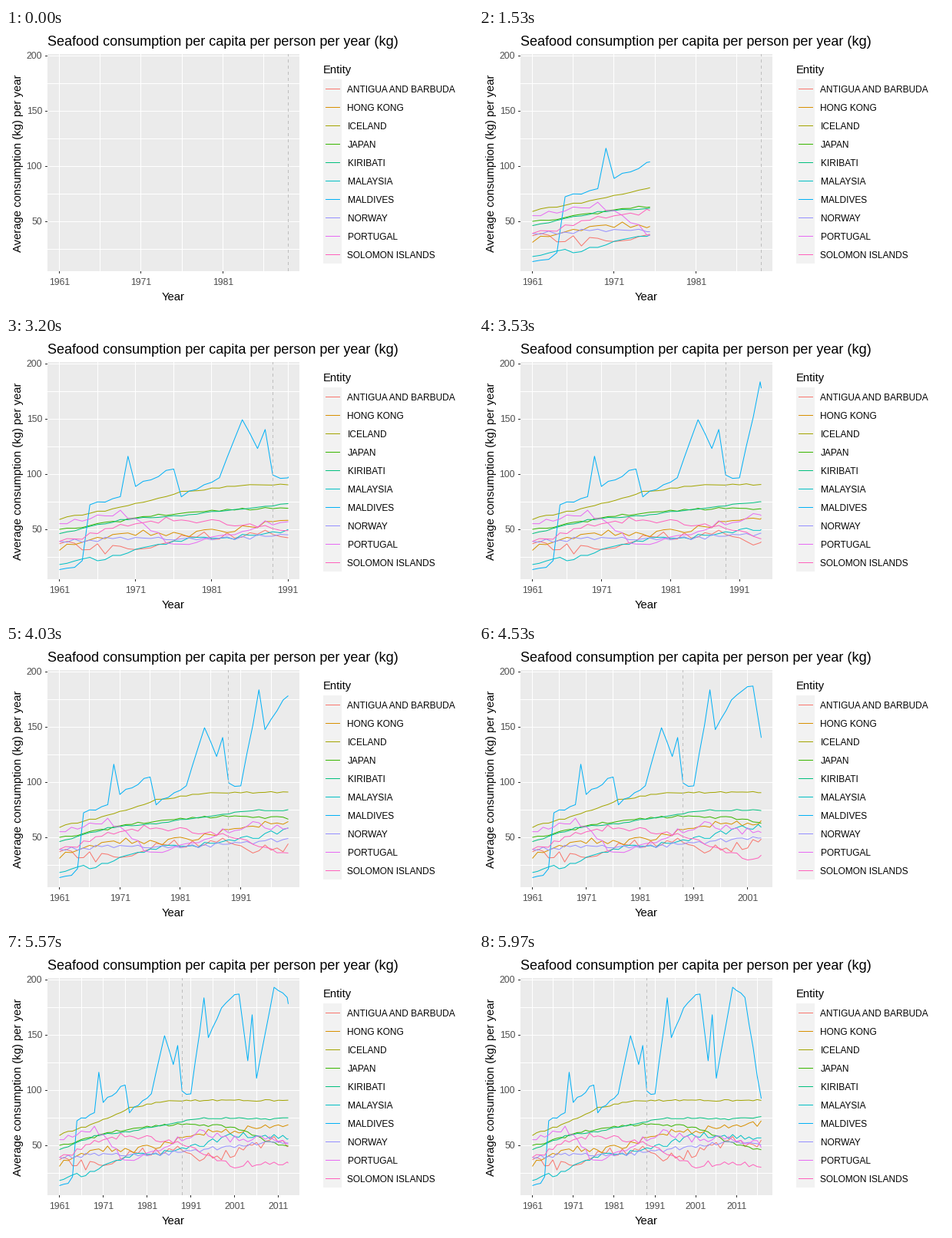
These frames come from a looping animation (608 px wide and 365 px high, 10 s). A matplotlib script:

```python
import matplotlib.pyplot as plt
import numpy as np
from matplotlib.animation import FuncAnimation
from matplotlib.patches import Rectangle

WIDTH, HEIGHT, DPI = 608, 365, 100
PX = 72 / DPI  # points per pixel
LEFT, RIGHT, TOP, BOTTOM = 54, 382, 34, 317
X_FIRST, X_SPAN = 69.5, 298
START, END, MARK = 1961, 2017, 1989
REVEAL_STEPS, STEPS_PER_MS = 180, 0.03
FRAMES, INTERVAL = 500, 20
YEARS = np.arange(START, END + 1)

plt.rcParams["font.family"] = "Liberation Sans"

# name: (colour, yearly wobble, trend at even spacing over the whole span)
TRENDS = {
    "ANTIGUA AND BARBUDA": ("#F8766D", 5, [36, 32, 40, 48, 41, 43, 55, 52]),
    "HONG KONG": ("#D89000", 3, [32, 48, 45, 51, 62, 64, 67, 70]),
    "ICELAND": ("#A3A500", 0.8, [60, 70, 84, 90, 91, 91, 91, 91]),
    "JAPAN": ("#39B600", 1.2, [50, 58, 66, 69, 69, 67, 53, 46]),
    "KIRIBATI": ("#00BF7D", 0.7, [46, 59, 63, 69, 75, 75, 74, 76]),
    "MALAYSIA": ("#00BFC4", 2.5, [20, 26, 41, 44, 50, 60, 58, 58]),
    "MALDIVES": ("#00B0F6", 2, None),
    "NORWAY": ("#9590FF", 2, [39, 42, 41, 43, 46, 50, 53, 51]),
    "PORTUGAL": ("#E76BF3", 4, [55, 65, 34, 50, 61, 56, 56, 52]),
    "SOLOMON ISLANDS": ("#FF62BC", 3, [38, 54, 60, 55, 45, 32, 36, 31]),
}
# The one volatile country follows its turning points instead.
PEAKS = {1961: 13, 1964: 20, 1965: 71, 1969: 81, 1970: 118, 1971: 91,
         1976: 105, 1977: 81, 1982: 97, 1985: 150, 1987: 122, 1988: 142,
         1989: 101, 1991: 95, 1994: 182, 1995: 149, 1999: 181, 2002: 189,
         2004: 127, 2005: 167, 2006: 110, 2010: 192, 2013: 185, 2017: 91}

rng = np.random.default_rng(7)


def yearly_values(wobble, trend):
    if trend:
        known = np.linspace(START, END, len(trend))
    else:
        known, trend = list(PEAKS), list(PEAKS.values())
    return np.interp(YEARS, known, trend) + rng.uniform(-wobble, wobble, YEARS.size)


def y_pos(value):
    return 324.5 - 1.44 * value


def pixel_center(x):
    return np.floor(x) + 0.5


fig = plt.figure(figsize=(WIDTH / 100, HEIGHT / 100), dpi=DPI, facecolor="white")
ax = fig.add_axes([0, 0, 1, 1])
ax.set(xlim=(0, WIDTH), ylim=(HEIGHT, 0))
ax.axis("off")


def line(color, z, xs=(), ys=(), **style):
    return ax.plot(xs, ys, color=color, lw=PX, zorder=z, snap=False,
                   solid_capstyle="butt", **style)[0]


def label(x, y, text, size, color="black", **style):
    return ax.text(x, y, text, fontsize=size * PX, color=color,
                   va="baseline", **style)


def block(x, y, w, h, color):
    ax.add_patch(Rectangle((x, y), w, h, fc=color, lw=0, antialiased=False))


# Panel and vertical axis
block(LEFT, TOP, RIGHT - LEFT, BOTTOM - TOP, "#EBEBEB")
for value in range(25, 201, 25):
    y = y_pos(value)
    line("white", 2, [LEFT, RIGHT], [y, y])
    if value % 50 == 0:
        line("#333333", 2, [LEFT - 3, LEFT], [y, y])
        label(47, y + 3.5, str(value), 12.2, "#4D4D4D", ha="right")

label(54, 23, "Seafood consumption per capita per person per year (kg)", 17.95)
label(218, 355, "Year", 14.8, ha="center")
label(20, 292.5, "Average consumption (kg) per year", 14.8, rotation=90,
      rotation_mode="anchor")

# Legend
label(413, 59, "Entity", 14.8)
block(413, 67, 24, 240, "#F2F2F2")
for row, (name, (color, _, _)) in enumerate(TRENDS.items()):
    y = 79.5 + 24 * row
    line(color, 2, [416, 435], [y, y])
    label(444.5, y + 4.5, name, 11.9)

# Moving parts
grid = {year: line("white", 2) for year in range(START, END + 1, 5)}
ticks = {year: (line("#333333", 2),
                label(0, 335, str(year), 12.3, "#4D4D4D", ha="center"))
         for year in range(START, END + 1, 10)}
curves = [(line(color, 3), yearly_values(wobble, trend))
          for color, wobble, trend in TRENDS.values()]
marker = line("#BEBEBE", 4, linestyle=(0, (4, 4)), dash_capstyle="butt")


def update(frame):
    step = round(frame * INTERVAL * STEPS_PER_MS)
    now = START + (END - START) * min(step / (REVEAL_STEPS - 1), 1)
    scale = X_SPAN / (max(now, MARK) - START)

    def x_pos(year):
        return X_FIRST + (year - START) * scale

    def place(rule, year, y0, y1):
        x = pixel_center(x_pos(year))
        rule.set_data([x, x], [y0, y1])
        rule.set_visible(x < RIGHT)

    for year, rule in grid.items():
        place(rule, year, BOTTOM, TOP)
    for year, (tick, text) in ticks.items():
        place(tick, year, BOTTOM, BOTTOM + 3)
        text.set_x(x_pos(year))
        text.set_visible(tick.get_visible())
    place(marker, MARK, BOTTOM, TOP)

    shown = np.append(YEARS[YEARS < now], now)
    for curve, values in curves:
        curve.set_data(x_pos(shown), y_pos(np.interp(shown, YEARS, values)))
        curve.set_visible(step > 0)
    return []


anim = FuncAnimation(fig, update, frames=FRAMES, interval=INTERVAL,
                     repeat=True, repeat_delay=0, blit=False)
plt.show()
```
